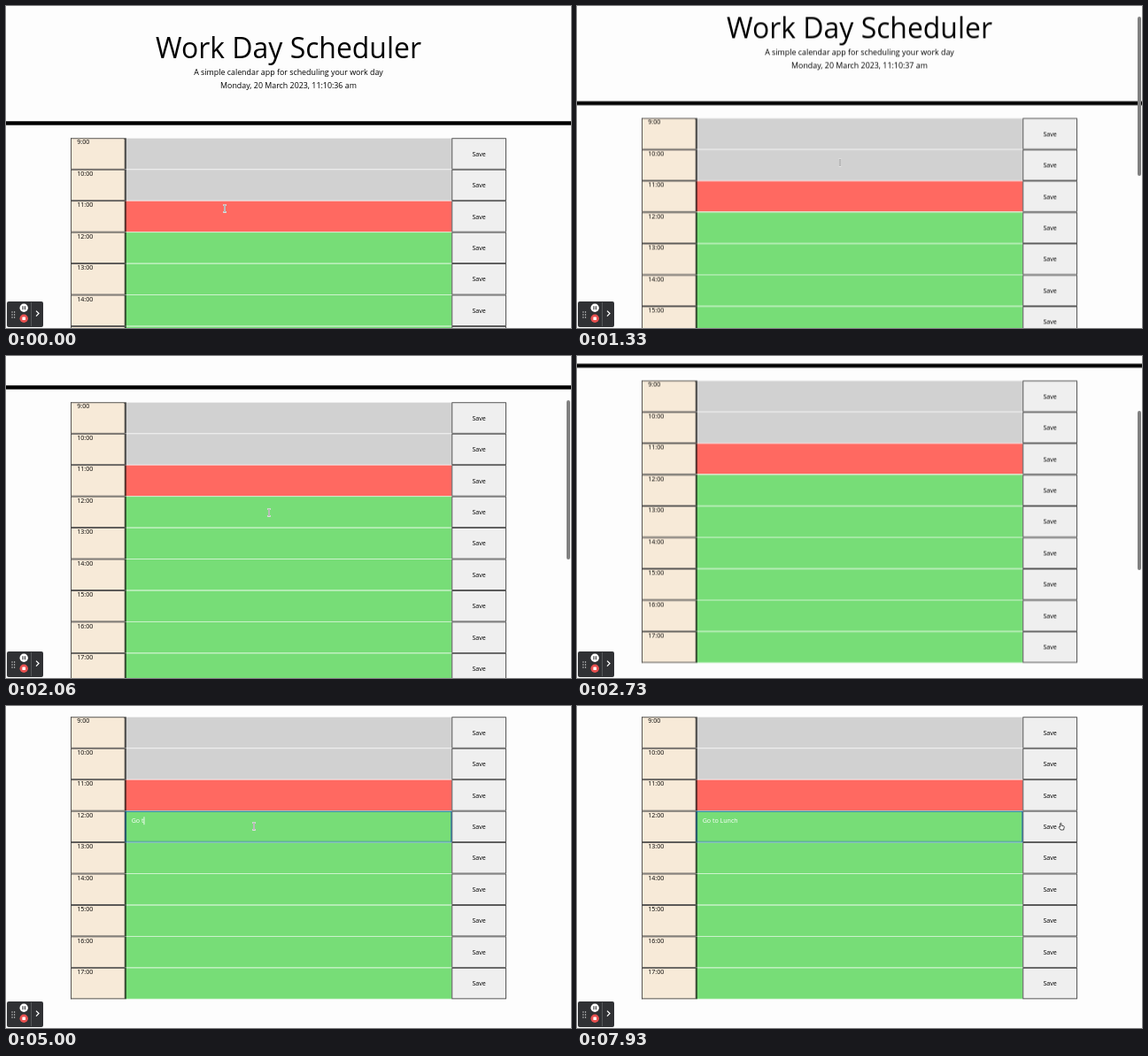
These frames come from a looping animation (638x364 px, 8000 ms). An HTML page:

```html
<!DOCTYPE html>
<html lang="en">
<head>
<meta charset="utf-8">
<title>Work Day Scheduler</title>
<style>
  html, body { margin: 0; width: 100%; height: 100%; overflow: hidden; background: #fdfdfd; }
  body { position: relative; font-family: "Open Sans", "Noto Sans", sans-serif; color: #000; }
  .scroll, .bar, .pointer, .ibeam, .hand, .focus, .caret, .day::after, .typed::before {
    animation: 8s linear infinite;
  }

  /* The page is laid out 1440px wide and scaled down to the stage. */
  .scroll { position: absolute; inset: 0; animation-name: scroll; }
  .page { position: absolute; width: 1440px; height: 1100px; transform: scale(.44306); transform-origin: 0 0; }
  .page > * { position: absolute; }
  .line { left: 0; width: 100%; text-align: center; line-height: 1; white-space: pre; font-size: 20px; }
  h1.line { margin: 0; top: 70px; font-size: 72px; font-weight: 400; }
  .lead { top: 157.5px; }
  .day { top: 193.5px; }
  .day::after { content: "36 am"; animation-name: clock; animation-timing-function: step-end; }
  .rule { top: 294px; width: 100%; height: 10px; background: #000; }

  .rows { left: 165px; top: 337px; width: 1110px; font-size: 16px; line-height: 1; }
  .row { display: flex; height: 80px; }
  .row > * { box-sizing: border-box; position: relative; }
  .hour { width: 138.75px; padding-left: 14px; background: #f7ead8; border: 2px solid #444; border-right-color: #000; }
  .slot { width: 832.5px; padding: 16px 0 0 13px; border: solid #fff; border-width: 1px 0; color: #fff; white-space: pre; }
  .slot::after { content: ""; position: absolute; left: 0; top: -1px; bottom: -1px; width: 2px; background: #000; }
  .past { background: #d1d1d1; }
  .present { background: #ff6961; }
  .future { background: #77dd77; }
  .save { width: 138.75px; background: #efefef; border: 2px solid #444; text-align: center; line-height: 76px; }

  .focus { position: absolute; inset: -1px 0; z-index: 1; border: 2px solid #1463b5; animation-name: focus; animation-timing-function: step-end; }
  .typed { padding-left: 3px; }
  .typed::before { content: ""; animation-name: type; animation-timing-function: step-end; }
  .caret { display: inline-block; width: 2px; height: 20px; margin: -2px 0 -4px; vertical-align: baseline; background: #fff; animation-name: caret; animation-timing-function: step-end; }

  .bar { position: absolute; right: 1px; top: 1px; width: 4px; height: 180px; border-radius: 2px; background: #808080; animation-name: bar, fade; }
  svg { position: absolute; left: 0; top: 0; width: 638px; height: 364px; overflow: visible; }
  .pointer { animation-name: point; animation-timing-function: ease-in-out; }
  .ibeam { animation-name: ibeam; animation-timing-function: step-end; }
  .hand { animation-name: hand; animation-timing-function: step-end; }

  @keyframes scroll {
    0%, 13.3% { transform: translateY(0); }
    16.625% { transform: translateY(-22.5px); }
    21.625% { transform: translateY(-65px); }
    25.75% { transform: translateY(-97px); }
    28.75% { transform: translateY(-110px); }
    34.125% { transform: translateY(-121.5px); }
    40%, 100% { transform: translateY(-137px); }
  }
  @keyframes bar {
    0%, 13.3% { transform: translateY(0); }
    16.625% { transform: translateY(11px); }
    21.625% { transform: translateY(32.5px); }
    25.75% { transform: translateY(49px); }
    28.75% { transform: translateY(55px); }
    34.125% { transform: translateY(61px); }
    40%, 100% { transform: translateY(69px); }
  }
  @keyframes fade {
    0%, 13.3% { opacity: 0; }
    14%, 43% { opacity: 1; }
    45.75%, 100% { opacity: 0; }
  }
  @keyframes point {
    0%, .75% { transform: translate(247px, 229px); }
    10.75%, 35.75% { transform: translate(297px, 177px); }
    45.75%, 90% { transform: translate(280px, 136px); }
    97.5%, 100% { transform: translate(547px, 136px); }
  }
  @keyframes ibeam { 0% { opacity: 1; } 33.5% { opacity: 0; } 35.75% { opacity: 1; } 95.3%, 100% { opacity: 0; } }
  @keyframes hand { 0% { opacity: 0; } 95.3%, 100% { opacity: 1; } }
  @keyframes clock { 0% { content: "36 am"; } 10% { content: "37 am"; } 22.5%, 100% { content: "38 am"; } }
  @keyframes focus { 0% { opacity: 0; } 47.5%, 100% { opacity: 1; } }
  @keyframes caret {
    0% { opacity: 0; } 47.5% { opacity: 1; } 53.75% { opacity: 0; } 58.25% { opacity: 1; }
    72.9% { opacity: 0; } 75.75% { opacity: 1; } 93.75%, 100% { opacity: 0; }
  }
  @keyframes type {
    0% { content: ""; }
    58.25% { content: "G"; }
    60% { content: "Go"; }
    60.75% { content: "Go "; }
    62.4% { content: "Go t"; }
    64.1% { content: "Go to"; }
    66.6% { content: "Go to "; }
    71.6% { content: "Go to L"; }
    76.6% { content: "Go to Lu"; }
    82.5% { content: "Go to Lun"; }
    85% { content: "Go to Lunc"; }
    87.5%, 100% { content: "Go to Lunch"; }
  }
</style>
</head>
<body>
<div class="scroll">
  <div class="page">
    <h1 class="line">Work Day Scheduler</h1>
    <div class="line lead">A simple calendar app for scheduling your work day</div>
    <div class="line day">Monday, 20 March 2023, 11:10:</div>
    <div class="rule"></div>
    <div class="rows"></div>
  </div>
</div>
<div class="bar"></div>
<svg viewBox="0 0 638 364">
  <g class="recorder">
    <rect x="1" y="334" width="41" height="29" rx="2" fill="#303134"/>
    <path d="M7 346h0M7 349h0M7 352h0M9.6 346h0M9.6 349h0M9.6 352h0" stroke="#ddd" stroke-width="1.4" stroke-linecap="round"/>
    <circle cx="20.2" cy="341.2" r="4.7" fill="#fff"/>
    <path d="M19 339.2v4M21.4 339.2v4" stroke="#303134" stroke-width="1.1"/>
    <circle cx="20.2" cy="353.2" r="4.7" fill="#e8504f"/>
    <rect x="18.4" y="351.4" width="3.6" height="3.6" rx=".5" fill="#fff"/>
    <path d="M28.5 335v27" stroke="#606164" stroke-width=".8"/>
    <path d="M34 344.6l3 3-3 3" fill="none" stroke="#fff" stroke-width="1.3"/>
  </g>
  <g class="pointer">
    <g class="ibeam" fill="none">
      <path id="beam" d="M-2-4Q0-4 0-3V3Q0 4-2 4M2-4Q0-4 0-3V3Q0 4 2 4" stroke="#eee" stroke-width="1.7"/>
      <use href="#beam" stroke="none"/>
      <path d="M-1.8-4Q0-4 0-3V3Q0 4-1.8 4M1.8-4Q0-4 0-3V3Q0 4 1.8 4" stroke="#8a8a8a" stroke-width=".6"/>
    </g>
    <path class="hand" d="M-1.4 1V-3.2Q-.7-4.2 0-3.2V-.8L2.6-.3Q3.4 0 3.2 1L2.5 4H-1L-3 1.2Q-3 .2-2.2.4Z" fill="#fff" stroke="#222" stroke-width=".8" stroke-linejoin="round"/>
  </g>
</svg>
<script>
  const NOW = 11, EDITED = 12;
  const state = h => h < NOW ? "past" : h === NOW ? "present" : "future";
  const entry = '<span class="typed"></span><i class="caret"></i><div class="focus"></div>';
  const row = h => `<div class="row"><div class="hour">${h}:00</div>` +
    `<div class="slot ${state(h)}">${h === EDITED ? entry : ""}</div><div class="save">Save</div></div>`;
  document.querySelector(".rows").innerHTML = Array.from({ length: 9 }, (_, i) => row(i + 9)).join("");
</script>
</body>
</html>
```
